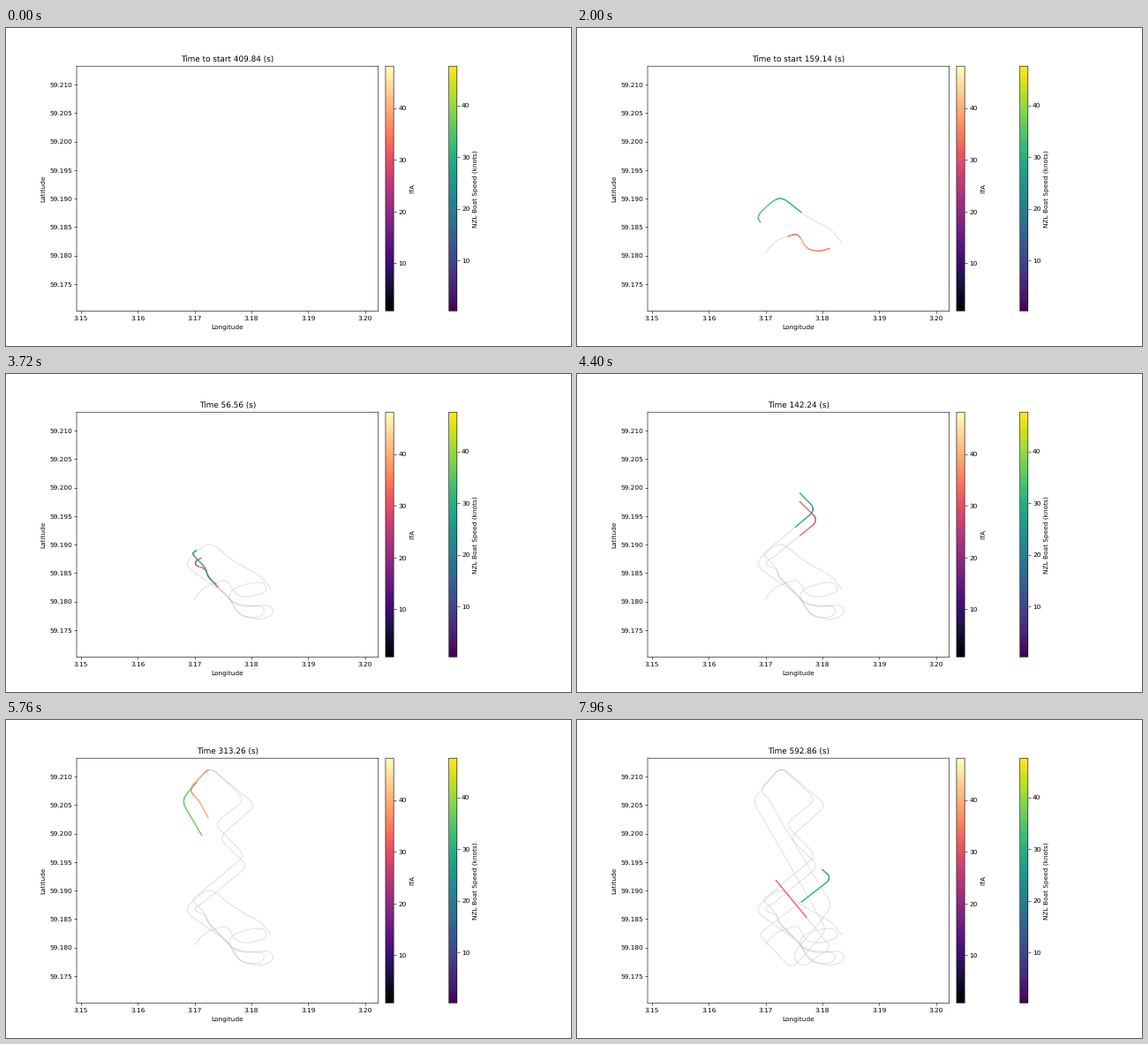
Recreate the animation shown at these times as a matplotlib script. Size 640 by 360 pixels, loop 8 s.

```python
import numpy as np
import matplotlib.pyplot as plt
from matplotlib.animation import FuncAnimation
from matplotlib.cm import ScalarMappable
from matplotlib.collections import LineCollection
from matplotlib.colors import Normalize

plt.rcParams.update({"path.snap": False, "text.hinting": "none"})

FRAMES = 200
INTERVAL = 40
TRAIL = 10      # frames of track kept in colour
SUB = 4         # track samples per frame
STEPS = np.arange((FRAMES - 1) * SUB + 1) / SUB

LON0, LON1 = 3.14924, 3.20230
LAT0, LAT1 = 59.17028, 59.21326
LEFT, RIGHT, TOP, BOTTOM = 80.0, 421.7, 43.2, 320.4   # axes edges on the stage

# Race clock in seconds from the gun, at a few frames
CLOCK_FRAMES = [0, 50, 93, 128, 144, 177, 199]
CLOCK = [-409.84, -159.14, 56.56, 232.96, 313.26, 482.11, 592.86]

# Course corners on the stage (x + y j, y down), one list per leg;
# the last point of each leg is reached at the matching frame.
LEG_ENDS = [0, 12, 40, 50, 93, 128, 144, 177, 199]
NZL = [
    [299.5 + 243j],
    [298 + 240.5j],
    [288 + 228j, 270 + 219j, 254.5 + 209.5j],
    [235 + 193j, 225 + 193j, 204 + 212j, 207 + 220j],
    [218 + 228j, 240 + 243j, 252 + 251j, 262 + 272j, 288 + 279j, 304 + 272j,
     300 + 261j, 268 + 264j, 254 + 256j, 242 + 241j, 228 + 230j, 227 + 220j,
     210 + 203.5j, 214.5 + 200.5j],
    [271 + 153.5j, 236 + 118j, 271 + 90j, 243.5 + 65j],
    [231 + 53j, 198.5 + 91j, 222 + 131j],
    [283 + 238j, 243 + 282j, 210.5 + 247j],
    [206 + 242j, 255.5 + 205j, 289 + 179j, 277.5 + 169j],
]
ITA = [
    [213.5 + 255j],
    [215 + 252j],
    [226 + 240j, 238.5 + 236j],
    [251 + 232j, 259 + 250j, 274 + 253j, 287 + 249.5j],
    [296 + 246j, 293 + 236j, 278 + 236j, 254 + 244j, 252 + 257j, 268 + 262j,
     294 + 263j, 290 + 276j, 266 + 275j, 257 + 259j, 240.5 + 242j,
     228.5 + 229j, 226 + 220j, 214 + 217j, 215 + 211j, 220 + 209.5j],
    [274 + 165.5j, 241 + 133.5j, 283 + 96.5j, 257 + 75j],
    [231 + 53j, 206.5 + 79j, 218 + 90j, 229 + 111j],
    [289.5 + 210.5j, 243 + 267j, 257 + 281j, 270 + 268.5j],
    [289 + 259j, 259.5 + 223j, 225 + 181j],
]


def round_corners(pts, radius=10, n=20):
    """Replace each corner by a quadratic arc of n + 1 samples."""
    gaps = np.diff(pts)
    cut = np.minimum(radius, abs(gaps) / 2) * gaps / abs(gaps)
    before = pts - np.r_[0, cut]
    after = pts + np.r_[cut, 0]
    u = np.linspace(0, 1, n + 1)
    arcs = (np.outer(before, (1 - u)**2) + np.outer(pts, 2 * u * (1 - u))
            + np.outer(after, u**2))
    return arcs.ravel()


def sail(legs, base, n=20):
    """Positions and knots at STEPS: faster heading south, slower in turns."""
    curve = round_corners(np.concatenate(legs), n=n)
    dist = np.r_[0, np.cumsum(abs(np.diff(curve)))]
    ends = np.cumsum([len(leg) for leg in legs]) - 1
    end_dist = dist[ends * (n + 1) + n // 2]

    s = np.arange(0, dist[-1], 0.5)
    way = np.gradient(np.interp(s, dist, curve))
    way /= abs(way)
    i = np.arange(len(s))
    ahead, behind = np.minimum(i + 10, i[-1]), np.maximum(i - 10, 0)
    turn = abs(np.angle(way[ahead] / way[behind]))
    knots = base + 5 * way.imag - 4 * turn

    # Sailing time along the course, stretched to meet each leg's end
    time = np.cumsum(1 / knots)
    frame = np.interp(time, np.interp(end_dist, s, time), LEG_ENDS)
    at = np.interp(STEPS, frame, s)
    return np.interp(at, dist, curve), np.interp(at, s, knots)


def to_lonlat(z):
    lon = LON0 + (z.real - LEFT) / (RIGHT - LEFT) * (LON1 - LON0)
    lat = LAT1 - (z.imag - TOP) / (BOTTOM - TOP) * (LAT1 - LAT0)
    return np.column_stack([lon, lat])


class Boat:
    def __init__(self, legs, base, cmap, norm, label, z):
        course, self.knots = sail(legs, base)
        self.track = to_lonlat(course)
        self.past, = ax.plot([], [], color="gray", alpha=0.23, lw=1.5, zorder=2)
        self.trail = LineCollection([], cmap=cmap, norm=norm, lw=2, zorder=z)
        ax.add_collection(self.trail, autolim=False)
        fig.colorbar(ScalarMappable(norm, cmap), ax=ax, pad=0.02, aspect=30,
                     label=label)

    def show(self, frame):
        head = frame * SUB
        tail = max(0, head - TRAIL * SUB)
        self.past.set_data(*self.track[:head + 1].T)
        pts = self.track[tail:head + 1]
        self.trail.set_segments(np.stack([pts[:-1], pts[1:]], axis=1))
        self.trail.set_array(self.knots[tail:head])


fig, ax = plt.subplots(figsize=(12, 6.75), dpi=640 / 12)
ax.set_xlim(LON0, LON1)
ax.set_ylim(LAT0, LAT1)
ax.ticklabel_format(useOffset=False)
ax.set_xlabel("Longitude")
ax.set_ylabel("Latitude")
title = ax.set_title("")

boats = [Boat(NZL, 33, "viridis", Normalize(0.2, 47.6),
              "NZL Boat Speed (knots)", 4),
         Boat(ITA, 36, "magma", Normalize(0.8, 48.1), "ITA", 3)]


def update(frame):
    clock = np.interp(frame, CLOCK_FRAMES, CLOCK)
    prefix = "Time to start" if clock < 0 else "Time"
    title.set_text(f"{prefix} {abs(clock):.2f} (s)")
    for boat in boats:
        boat.show(frame)
    return []


anim = FuncAnimation(fig, update, frames=FRAMES, interval=INTERVAL,
                     repeat=True, repeat_delay=0, blit=False)
plt.show()
```
